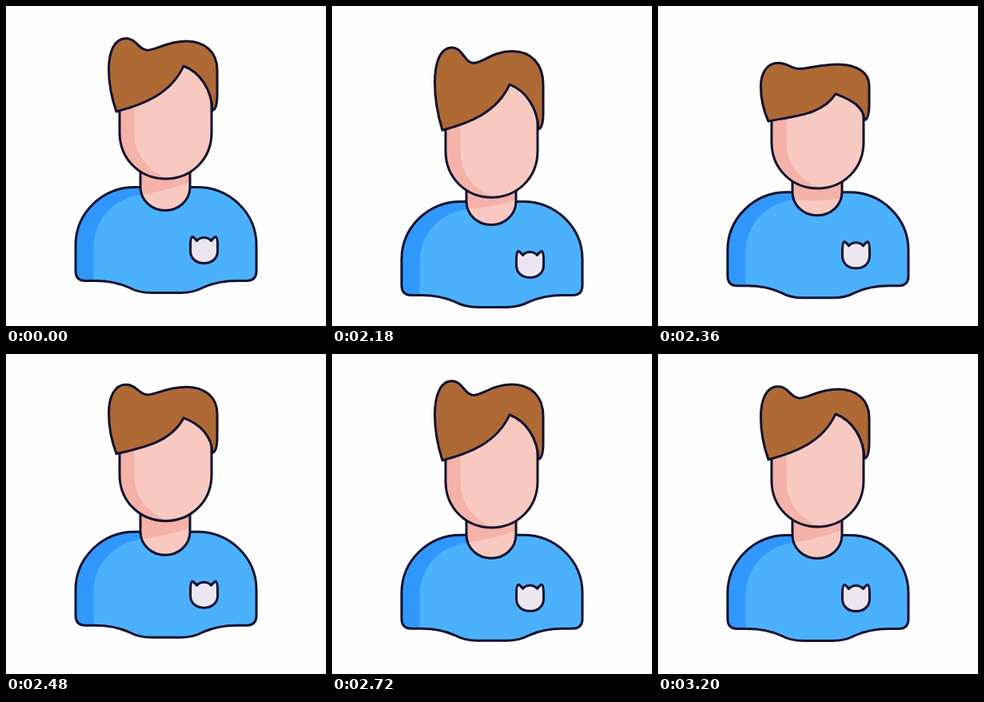
An HTML page for the animation above (3.23 s loop, 400x400 px).

```html
<!DOCTYPE html>
<html lang="en">
<head>
<meta charset="utf-8">
<title>Bouncing avatar</title>
<style>
  html, body { margin: 0; width: 100%; height: 100%; overflow: hidden; background: #fefefe; }
  svg { display: block; width: 100%; height: 100%; }
  path { stroke-linejoin: round; stroke-linecap: round; }
  .line { stroke: #11112f; stroke-width: 3; }
</style>
</head>
<body>
<svg viewBox="0 0 400 400" fill="none">
  <defs>
    <path id="torso" d="M161 226.5C120 226.5 87 259 87 299V331Q87 343.5 99.500 343.500H112C130 343.500 145 348 154 352C163 357 172 358.500 182 358.500H218C228 358.500 237 357 246 352C255 348 270 343.500 288 343.500H300.500Q313 343.500 313 331V299C313 259 280 226.500 239 226.500Z"/>
    <path id="neck" d="M168 190V226C168 243 182 255.500 199 255.500S230 243 230 226V190"/>
    <path id="face" d="M222 68L142 115V158C142 192 168 216 199.500 216S257 192 257 158V115L250 80Z"/>
    <clipPath id="neckClip"><use href="#neck"/></clipPath>
  </defs>
  <g id="body">
    <use href="#torso" fill="#4bb1fd"/>
    <path fill="#3098fd" d="M109.500 343.500V303C109.500 268 134 240 170 236V226.500H161C120 226.500 87 259 87 299V331Q87 343.500 99.500 343.500Z"/>
    <use href="#torso" class="line"/>
    <use href="#neck" fill="#f7c9c1"/>
    <g clip-path="url(#neckClip)"><path id="neckShade" fill="#f4b2a9"/></g>
    <use href="#neck" class="line"/>
    <path class="line" fill="#ebe6ef" d="M230.500 300Q230.500 289 233 288.500Q235 289 238.500 293.500Q242 289.500 247.500 289.500T256.500 293.500Q260 289 262 288.500Q264.500 289 264.500 300V306C264.500 316 257 321.500 247.500 321.500S230.500 316 230.500 306Z"/>
  </g>
  <g id="head">
    <use href="#face" fill="#f7c9c1"/>
    <path fill="#f4b2a9" d="M142 115H160.500V160C160.500 186 180 210 205 216H199.500C168 216 142 192 142 158Z"/>
    <use href="#face" class="line"/>
    <path id="hair" class="line" fill="#af6935"/>
  </g>
</svg>
<script>
const LOOP = 3230, START = 2030, STEP = 30;
const el = id => document.getElementById(id);
const [body, head, hair, neckShade] = ['body', 'head', 'hair', 'neckShade'].map(el);

// Each track lists [time, value] extremes, eased in and out.
const tracks = {
  body: [[2000, 0], [2207, 18.8], [2500, -4.6], [2800, .7], [3110, 0]],
  head: [[2000, 0], [2030, -.4], [2233, 28], [2510, -8.5], [2720, 1], [2920, 0]],
  lift: [[2010, 0], [2180, 11.8], [2370, -19], [2610, 13], [2870, -.5], [3110, 0]],
  drop: [[2190, 0], [2370, 23], [2600, 0]]
};

function valueAt(track, t) {
  const i = track.findIndex(([time]) => time > t);
  if (i < 1) return 0;
  const [t0, v0] = track[i - 1], [t1, v1] = track[i];
  const p = (t - t0) / (t1 - t0);
  return v0 + (v1 - v0) * p * p * (3 - 2 * p);
}

function hairPath(lift, drop) {
  const up = (y, k = 1) => y - lift * k;
  const down = (y, k = 1) => y + drop * k;
  return `M138 132C132 ${up(115, .2)} 128.500 ${up(95, .4)} 128.500 ${up(79, .5)}
    C128.500 ${up(58, .85)} 135 ${up(40.5)} 150 ${up(40.5)}
    C163 ${up(40.5)} 166 ${up(55.2, .6)} 177 ${up(55.2, .6)}
    C188 ${up(55.2, .6)} 201 ${up(44, .9)} 225 ${up(44, .9)}
    C248 ${up(44, .9)} 264 ${up(57, .75)} 264 ${up(80, .4)}
    V110C264 122 262 130 258 130.500
    C257 ${down(105, .4)} 243 ${down(83)} 222 ${down(75)}
    C206 ${down(110, .6)} 172 ${down(123, .1)} 138 132Z`;
}

function draw(now) {
  let t = now % LOOP;
  t = t < START ? 0 : t - (t - START) % STEP;
  const bodyY = valueAt(tracks.body, t), headY = valueAt(tracks.head, t);
  const lift = valueAt(tracks.lift, t), drop = valueAt(tracks.drop, t);
  body.setAttribute('transform', `translate(0 ${bodyY})`);
  head.setAttribute('transform', `translate(0 ${headY})`);
  hair.setAttribute('d', hairPath(lift, drop));
  const right = 219 + headY - bodyY + drop * .4;
  neckShade.setAttribute('d', `M160 190V236H168Q203 ${(235 + right) / 2 + 4} 232 ${right}V190Z`);
  requestAnimationFrame(() => draw(performance.now() - begin));
}

const begin = performance.now();
draw(0);
</script>
</body>
</html>
```
